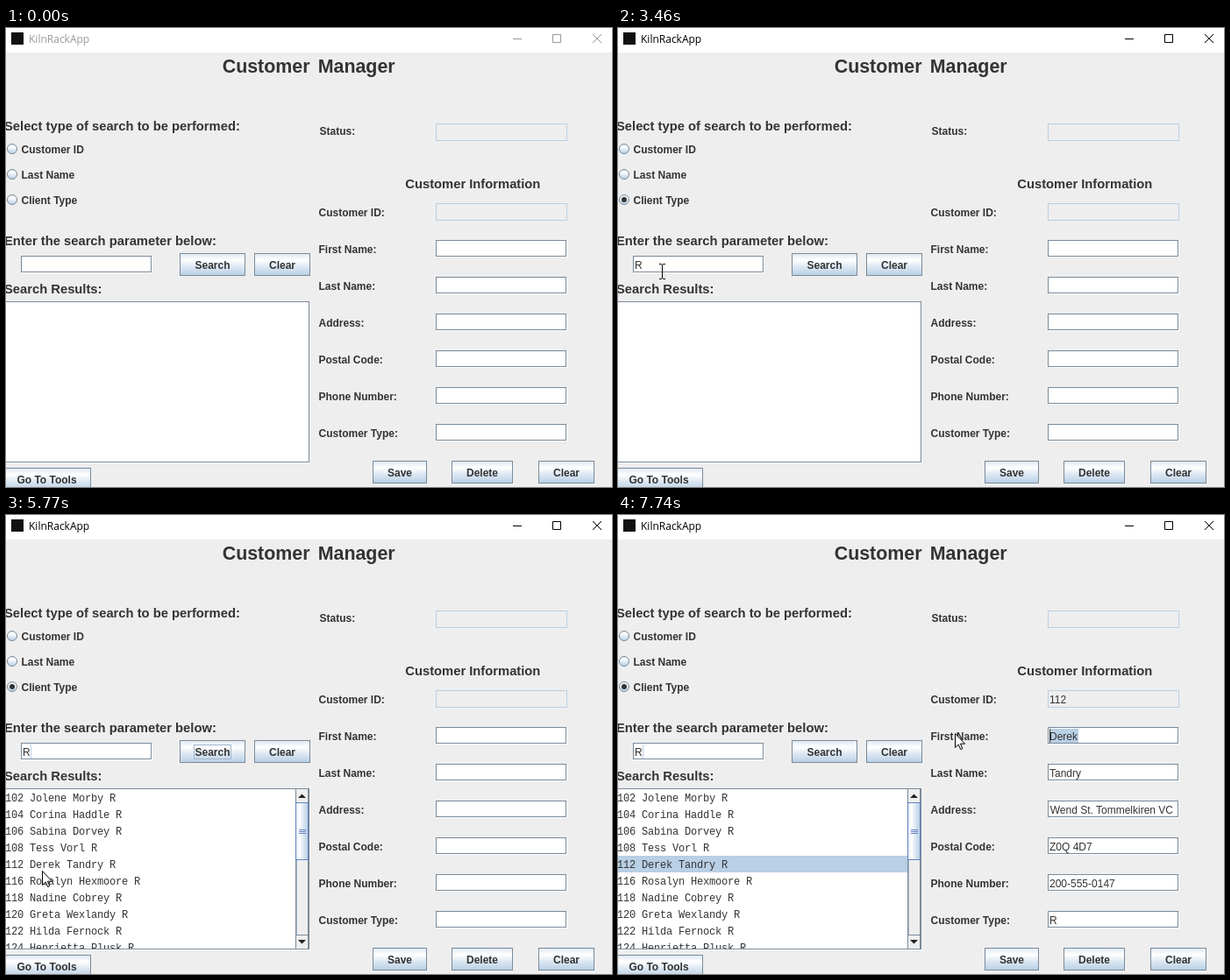
Write an HTML page that moves like this. It is 691 px wide and 524 px high and loops after 8 s.

```html
<!DOCTYPE html>
<html lang="en">
<head>
<meta charset="utf-8">
<title>Customer Manager</title>
<style>
  html, body { margin: 0; width: 100%; height: 100%; overflow: hidden; background: #eee; }
  svg { display: block; }
  text { font: 12px "Liberation Sans", Arial, sans-serif; fill: #333; white-space: pre; }
  .b { font-weight: bold; }
  .h { font-weight: bold; font-size: 14.75px; }
  .title { font-weight: bold; font-size: 21.4px; word-spacing: 3.2px; }
  .mono { font-family: "Liberation Mono", "Courier New", monospace; letter-spacing: -0.2px; }
  .bar { font-family: "Open Sans", sans-serif; fill: currentColor; }
  .mid { text-anchor: middle; }
  .end { text-anchor: end; }
</style>
</head>
<body>
<svg id="stage" width="691" height="524" viewBox="0 0 691 524">
  <defs>
    <linearGradient id="steel" x1="0" y1="0" x2="0" y2="1">
      <stop offset="0" stop-color="#dde8f3"/>
      <stop offset=".3" stop-color="#fff"/>
      <stop offset=".6" stop-color="#dde8f3"/>
      <stop offset="1" stop-color="#b8cfe5"/>
    </linearGradient>
    <linearGradient id="thumb" href="#steel" x1="0" y1="0" x2="1" y2="0"/>
    <clipPath id="listClip"><rect x="0" y="313" width="330" height="182"/></clipPath>
    <clipPath id="fieldClip"><rect x="492" y="328" width="145" height="16"/></clipPath>
  </defs>
</svg>
<script>
const LOOP = 8000;
const EDGE = '#7a8a99', PALE = '#b8cfe5', SOFT = '#a3b8cc', BLUE = '#6382bf';
const stage = document.getElementById('stage');

function add(tag, attrs, parent = stage) {
  const el = document.createElementNS('http://www.w3.org/2000/svg', tag);
  for (const key in attrs) el.setAttribute(key, attrs[key]);
  return parent.appendChild(el);
}
const group = (attrs, parent) => add('g', attrs || {}, parent);
const fill = (x, y, width, height, color, parent) =>
  add('rect', { x, y, width, height, fill: color }, parent);
const box = (x, y, w, h, stroke, color = 'none', parent) =>
  add('rect', { x: x + .5, y: y + .5, width: w - 1, height: h - 1, stroke, fill: color }, parent);
const path = (d, attrs, parent) => add('path', { d, fill: 'none', ...attrs }, parent);
function label(x, y, str, cls, parent) {
  const el = add('text', { x, y, class: cls || '' }, parent);
  el.textContent = str;
  return el;
}
const show = (el, on) => el.setAttribute('visibility', on ? 'visible' : 'hidden');

// Window bar
fill(0, 0, 691, 28, '#fff');
fill(6, 5, 14, 14, '#111');
const bar = group();
label(26, 17, 'KilnRackApp', 'bar', bar);
path('M578 12.5h10M623.5 7.5h9v9h-9zM669 7l10 10M679 7l-10 10', { stroke: 'currentColor' }, bar);

// Headings
label(246.7, 51, 'Customer Manager', 'title');
label(-2, 117, 'Select type of search to be performed:', 'h');
label(-2, 248, 'Enter the search parameter below:', 'h');
label(-2, 303, 'Search Results:', 'h');
label(455.3, 183, 'Customer Information', 'h');

// Radio buttons
const radios = ['Customer ID', 'Last Name', 'Client Type'].map((name, i) => {
  const cy = 138 + 29 * i;
  const dial = add('circle', { cx: 7, cy, r: 5.5, fill: 'url(#steel)', stroke: EDGE });
  const ring = add('circle', { cx: 7, cy, r: 4, fill: 'none', stroke: PALE, 'stroke-width': 2 });
  label(17.5, 143 + 29 * i, name, 'b');
  return { dial, ring, top: cy - 10 };
});
const dot = add('circle', { cx: 7, cy: 196, r: 3, fill: '#333' });
const radioFocus = box(16, 187, 65, 18, SOFT);

// Text fields
const fields = [];
function field(x, y) {
  fill(x + 1, y + 1, 149, 19, '#fff');
  box(x, y, 149, 19, EDGE);
  fields.push([x, y]);
}
label(357.5, 122, 'Status:', 'b');
box(490, 109, 150, 20, PALE);
label(356.5, 215, 'Customer ID:', 'b');
box(490, 200, 150, 20, PALE);
['First Name', 'Last Name', 'Address', 'Postal Code', 'Phone Number', 'Customer Type']
  .forEach((name, i) => {
    label(356.5, 257 + 42 * i, name + ':', 'b');
    field(490, 242 + 42 * i);
  });
field(17, 260);

const nameEnd = 525;
const picked = fill(492, 244, 33, 16, PALE);
const nameCaret = fill(492, 244, 1, 16, '#333');
const details = group();
['112', 'Derek', 'Tandry', '', 'Z0Q 4D7', '200-555-0147', 'R']
  .forEach((str, i) => str && label(492, 215 + 42 * i, str, '', details));
label(633, 341, 'Wend St. Tommelkiren VC', 'end', group({ 'clip-path': 'url(#fieldClip)' }, details));

const typed = label(19, 275, 'R');
const caret = fill(19, 262, 1, 16, '#333');

// Buttons
function button(x, y, w, str) {
  const face = box(x, y, w, 26, EDGE, 'url(#steel)');
  const glow = box(x + 1, y + 1, w - 2, 24, '#8fabd0');
  show(glow, false);
  label(x + w / 2, y + 18, str, 'b mid');
  return { face, glow };
}
const search = button(198, 257, 75, 'Search');
const searchFocus = box(214, 262, 43, 17, SOFT);
button(283, 257, 64, 'Clear');
button(418, 494, 62, 'Save');
button(508, 494, 70, 'Delete');
button(607, 494, 64, 'Clear');
button(-4, 502, 101, 'Go To Tools');

// Result list
box(-2, 312, 348, 184, EDGE, '#fff');
fill(0, 496, 347, 1, '#fff');
const results = group();
const list = group({ 'clip-path': 'url(#listClip)' }, results);
const row = fill(0, 389, 330, 19, PALE, list);
const rowFocus = box(-2, 389, 332, 19, BLUE, 'none', list);
['102 Jolene Morby', '104 Corina Haddle', '106 Sabina Dorvey', '108 Tess Vorl',
 '112 Derek Tandry', '116 Rosalyn Hexmoore', '118 Nadine Cobrey', '120 Greta Wexlandy',
 '122 Hilda Fernock', '124 Henrietta Plusk']
  .forEach((str, i) => label(-1, 327 + 19 * i, str + ' R', 'mono', list));

// Scroll bar
box(330, 312, 15, 184, EDGE, '#eee', results);
fill(331, 329, 1, 150, SOFT, results);
box(330, 312, 15, 17, EDGE, '#eee', results);
box(330, 479, 15, 17, EDGE, '#eee', results);
box(330, 328, 15, 66, BLUE, 'url(#thumb)', results);
path('M334 359.5h8M334 361.5h8M334 363.5h8', { stroke: BLUE }, results);
path('M333 323h9l-4.500-4.500zM333 485h9l-4.500 4.500z', { fill: '#222' }, results);

// Pointer
const arrow = path('M.5 .5V16.500L4.200 13L6.700 18.500L8.800 17.500L6.400 12.200H11.500Z',
  { fill: '#fff', stroke: '#000' });
const beam = path('M-3 -8.500H-1L.5 -7.500L2 -8.500H4M.5 -7.500V7.500M-3 8.500H-1L.5 7.500L2 8.500H4',
  { stroke: '#000' });

const ease = {
  both: p => p * p * (3 - 2 * p),
  in: p => p * p,
  out: p => p * (2 - p)
};
// start, end, steps, x, y, easing
const moves = [
  [230, 1010, 13, 26, 198, 'both'],
  [1060, 1200, 3, 18, 195, 'out'],
  [1630, 2150, 8, 50, 278, 'both'],
  [3710, 4225, 9, 207, 273, 'both'],
  [4730, 5510, 13, 4, 417, 'both'],
  [5580, 5770, 4, 41, 406, 'out'],
  [6450, 6640, 4, 100, 413, 'in'],
  [6710, 7110, 6, 540, 261, 'out'],
  [7360, 7420, 2, 562, 247, 'out'],
  [7480, 7740, 5, 384, 249, 'out']
];

function pointerAt(t) {
  let x = 612, y = 442;
  for (const [t0, t1, n, nx, ny, kind] of moves) {
    if (t < t0) break;
    const step = Math.min(n, 1 + Math.floor((t - t0) / (t1 - t0) * (n - 1) + 1e-6));
    const p = ease[kind](step / n);
    x += (nx - x) * p;
    y += (ny - y) * p;
  }
  return [Math.round(x), Math.round(y)];
}

const inside = (x, y, l, t, w, h) => x >= l && x < l + w && y >= t && y < t + h;

function draw(t) {
  const within = (a, b) => t >= a && t < b;
  const [x, y] = pointerAt(t);
  const seen = t >= 230;
  const overField = fields.some(([l, top]) => inside(x, y, l, top, 150, 20));
  for (const el of [arrow, beam]) el.setAttribute('transform', `translate(${x} ${y})`);
  show(arrow, seen && !overField);
  show(beam, seen && overField);

  bar.style.color = t < 1260 ? '#999' : '#000';
  for (const r of radios) show(r.ring, seen && inside(x, y, 0, r.top, 81, 20));
  radios[2].dial.setAttribute('fill', within(1260, 1320) ? PALE : 'url(#steel)');
  show(dot, t >= 1320);
  show(radioFocus, within(1260, 2150));

  // The caret stays as a pale line once the field has lost focus.
  show(typed, t >= 2960);
  show(caret, within(2150, 2580) || within(2960, 3460) || t >= 3960);
  caret.setAttribute('x', t < 2960 ? 19 : 28);
  caret.setAttribute('fill', t < 4225 ? '#333' : PALE);

  show(search.glow, seen && inside(x, y, 198, 257, 75, 26));
  search.face.setAttribute('fill', within(4225, 4290) ? PALE : 'url(#steel)');
  show(searchFocus, within(4225, 6090));

  show(results, t >= 4290);
  show(row, t >= 6090);
  show(rowFocus, within(6090, 7420));
  show(details, t >= 6210);

  const from = Math.max(492, Math.min(nameEnd, x));
  picked.setAttribute('x', from);
  picked.setAttribute('width', nameEnd - from);
  nameCaret.setAttribute('x', from);
  show(picked, t >= 7420);
  show(nameCaret, t >= 7420);
}

const start = performance.now();
function tick() {
  draw((performance.now() - start) % LOOP);
  requestAnimationFrame(tick);
}
draw(0);
requestAnimationFrame(tick);
</script>
</body>
</html>
```
